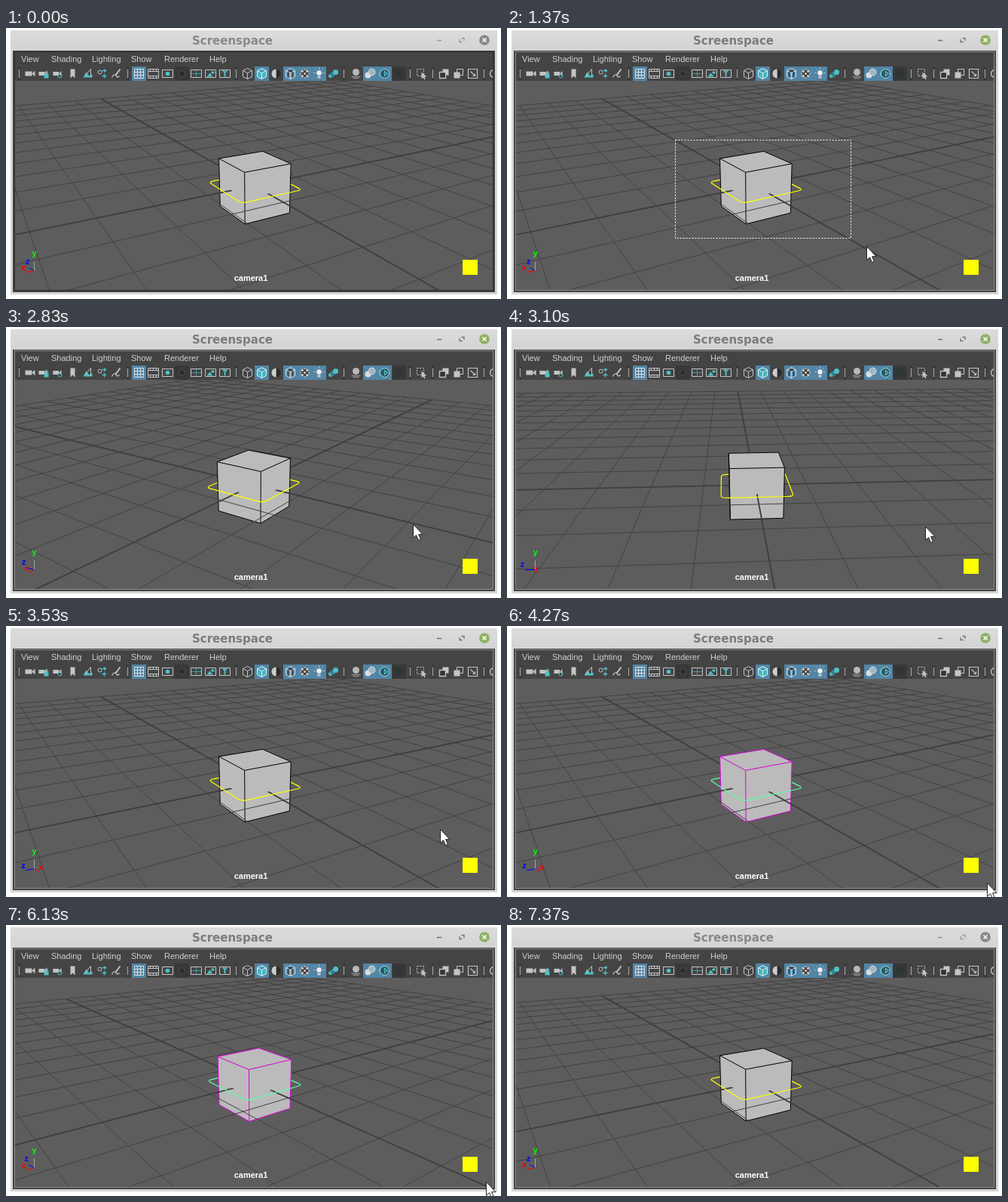
An HTML page for the animation above (7560 ms loop, 657x359 px).

```html
<!DOCTYPE html>
<html lang="en">
<head>
<meta charset="utf-8">
<title>Screenspace</title>
<style>
html, body { margin: 0; width: 100%; height: 100%; overflow: hidden; background: #fff; }
svg { display: block; }
text { font-family: "Liberation Sans", sans-serif; }
#title { font: bold 15px "DejaVu Sans", sans-serif; }
.menu { font-size: 11px; fill: #cfcfcf; }
.axis { font-size: 11px; font-weight: bold; text-anchor: middle; }
</style>
</head>
<body>
<svg width="657" height="359" viewBox="0 0 657 359">
  <defs>
    <linearGradient id="bar" x1="0" y1="0" x2="0" y2="1">
      <stop offset="0" stop-color="#dcdcdc"/><stop offset="1" stop-color="#d3d3d3"/>
    </linearGradient>
    <clipPath id="port"><rect x="12" y="70" width="634" height="277"/></clipPath>
    <clipPath id="panel"><rect x="10" y="31" width="637" height="40"/></clipPath>
  </defs>
  <rect x="6" y="3" width="646" height="350" fill="#d6d6d6"/>
  <rect x="6" y="3" width="646" height="27" fill="url(#bar)"/>
  <text id="title" x="247" y="22">Screenspace</text>
  <g id="buttons" fill="none" stroke-width="1.500">
    <path d="M572 16.500h6"/>
    <path d="M604.500 13.500h3.500v3.500M605.500 18.500h-3.500v-3.500" stroke-width="1.300"/>
  </g>
  <circle id="close" cx="635" cy="16" r="6.800"/>
  <path d="M632.500 13.500l5 5m0-5l-5 5" stroke="#fff" stroke-width="1.600"/>
  <rect x="9" y="30" width="640" height="320" fill="#444"/>
  <g id="menu"></g>
  <g id="tools" clip-path="url(#panel)"></g>
  <rect x="12" y="70" width="634" height="277" fill="#5d5d5d"/>
  <g clip-path="url(#port)" fill="none">
    <path id="lowFill" fill="#bbb"/>
    <path id="lowEdge"/>
    <path id="thin" stroke="#434343"/>
    <path id="thick" stroke="#3f3f3f" stroke-width="1.900"/>
    <path id="ring" stroke-width="1.200"/>
    <path id="upFill" fill="#bbb"/>
    <path id="upEdge"/>
    <g id="gizmo"></g>
  </g>
  <rect x="606" y="307" width="20" height="20" fill="#ff0"/>
  <text x="325" y="335" text-anchor="middle" font-size="11" font-weight="bold" fill="#fff">camera1</text>
  <rect id="border" x="11.500" y="31.500" width="635" height="316" fill="none"/>
  <rect id="marquee" fill="none" stroke="#fff" stroke-dasharray="2 2"/>
  <path id="cursor" d="M.5 -.5V17.500L4.500 13.700L7.500 20.500L10.400 19.300L7.600 12.700H13z" fill="#fff" stroke="#222"/>
</svg>
<script>
const LOOP = 7560, STEP = 33.34;
const $ = id => document.getElementById(id);
const set = (el, attrs) => { for (const k in attrs) el.setAttribute(k, attrs[k]); };
const add = (parent, tag, attrs, text) => {
  const el = document.createElementNS('http://www.w3.org/2000/svg', tag);
  set(el, attrs);
  if (text) el.textContent = text;
  parent.appendChild(el);
  return el;
};

// Menu and toolbar
[['View', 20], ['Shading', 60], ['Lighting', 114], ['Show', 166], ['Renderer', 210], ['Help', 270]]
  .forEach(([s, x]) => add($('menu'), 'text', { x, y: 45, class: 'menu' }, s));

const LIGHT = '#c4c4c4', TEAL = '#4fc0c8', DARK = '#2b2b2b';
const tools = $('tools');
const line = (x, d, stroke = LIGHT, w = 1, fill = 'none') =>
  add(tools, 'path', { d, stroke, fill, 'stroke-width': w, transform: `translate(${x + .5} 60.5)` });
const solid = (x, d, fill = LIGHT) => line(x, d, 'none', 0, fill);
const dot = (x, y, r, fill = TEAL, stroke = 'none') =>
  add(tools, 'circle', { cx: x + .5, cy: 60.5 + y, r, fill, stroke });
const tile = (x, fill) => add(tools, 'rect', { x: x - 9, y: 51, width: 19, height: 19, fill });

[17, 161, 305, 448, 536, 566, 634].forEach(x => {
  line(x, 'M0 -8V8', '#2f2f2f', 3);
  line(x, 'M0 -6V6', '#a0a0a0', 1.5);
});
[176, 339, 377, 396, 415, 483, 502].forEach(x => tile(x, '#5285a6'));
[233, 521].forEach(x => tile(x, '#383838'));

const box = 'M0 -7L6 -4V4L0 7L-6 4V-4zM-6 -4L0 -1L6 -4M0 -1V7';
const frame = 'M-7 -5H7V5H-7z';
const cam = (x, s) => solid(x, `M${-6 * s} ${-3 * s}H${3 * s}V${3 * s}H${-6 * s}zM${3 * s} 0L${7 * s} ${-4 * s}V${4 * s}z`);
cam(31, 1);
cam(48, .85); solid(51, 'M-1 1H5V6H-1z', TEAL); line(51, 'M0 1V-2Q2 -5 4 -2V1', TEAL);
cam(67, .85); dot(71, 3, 2.5, 'none', TEAL);
solid(88, 'M-3 -6H3V6L0 3L-3 6z');
solid(108, 'M-6 5L-2 -2L2 3L6 1V5z', TEAL); line(108, 'M-4 3L4 -6V4');
dot(124, -2, 2.5, 'none', LIGHT); line(127, 'M0 -4H5M3 -6L5 -4L3 -2M0 3H6M3 0V6', TEAL, 1.3);
line(146, 'M5 -6L-1 2', LIGHT, 2); line(146, 'M-6 5Q-3 -1 0 3Q1 6 4 3', LIGHT, 1.3);
line(176, 'M-6 -6H6V6H-6zM-2 -6V6M2 -6V6M-6 -2H6M-6 2H6', '#dedede');
line(195, 'M-7 -6H7V6H-7zM-7 -3H7M-7 3H7M-4 -6V-3M0 -6V-3M4 -6V-3M-4 3V6M0 3V6M4 3V6');
line(214, frame); dot(214, 0, 2.8);
dot(233, 0, 4, '#2c2c2c', '#505050');
line(252, frame); line(252, 'M-7 0H7M0 -5V5', TEAL).setAttribute('stroke-dasharray', '2 1');
line(271, frame); solid(271, 'M-5 4L-1 -1L3 4zM1 -3H5V0H1z', TEAL);
line(290, frame); line(290, 'M-3 -3H3M0 -3V4', TEAL, 2);
line(320, box);
line(339, box, '#d8f3f5', 1, '#46b6c0');
dot(358, 0, 5.5, '#8a8a8a'); solid(358, 'M0 -6A6 6 0 0 1 0 6z', DARK); solid(358, 'M0 -6A6 6 0 0 0 0 6z', '#ccc');
line(377, box, '#ddd'); line(377, 'M-3 -5L3 -2V5M3 -5L-3 -2V5', DARK);
dot(396, 0, 6, '#ccc'); line(396, 'M-5 -2L2 5M-2 -5L5 2M-5 2L2 -5M-2 5L5 -2', '#333', 1.6);
dot(415, -1, 3.2, '#eee'); solid(415, 'M-2 3H2V6H-2z', '#ccc');
line(415, 'M-7 -1H-5M5 -1H7M0 -8V-6M-5 -6L-4 -5M5 -6L4 -5', '#ccc');
dot(430, 3, 2.5, TEAL); dot(433, 1, 3.2, '#318690'); dot(437, -2, 3.5, TEAL);
dot(464, -2, 4.5, '#b8b8b8'); line(464, 'M-6 4H6M-4 6H4', '#888', 1.3);
dot(480, 2, 4, '#ddd'); dot(485, -2, 4.5, '#9fb7c4', '#ddd');
dot(502, 0, 6, '#31515f', '#a7dce0'); line(502, 'M-2 -5A5 5 0 0 0 -2 5M0 -3L4 0L0 3z', TEAL, 1.3);
solid(521, 'M-5 -5H5V5H-5z', '#2d3535');
line(551, 'M-6 -6H3V3H-6z').setAttribute('stroke-dasharray', '2 1.5');
solid(551, 'M0 -2V7L2 5L4 8L5 7L4 4H7z');
solid(581, 'M-2 -6H6V2H-2z'); line(581, 'M-6 -2H2V6H-6z', LIGHT, 1.3, '#333');
line(600, 'M-2 -6H6V2H-2z'); solid(600, 'M-6 -2H2V6H-6z');
line(619, 'M-6 -6H6V6H-6zM-3 -3L3 3M0 3H3V0', LIGHT, 1.2);
line(646, 'M1 -5A5 5 0 0 0 1 5', LIGHT, 1.3);

// Camera orbiting the origin; ground is the plane h = 0
const DIST = 9.03, FOCAL = 617, SIN = 0.34, COS = 0.94, CX = 329.5, CY = 209, SIZE = 12, NEAR = 0.3;
let ux = 1, uy = 0;
const ground = (x, z) => [x * ux - z * uy, x * uy + z * ux];
const view = (x, z, h) => {
  const [r, t] = ground(x, z);
  return [r, t * SIN - h * COS, DIST - t * COS - h * SIN];
};
const flat = ([r, v, d]) => `${(CX + FOCAL * r / d).toFixed(2)} ${(CY + FOCAL * v / d).toFixed(2)}`;
const pt = (x, z, h) => flat(view(x, z, h));
const poly = pts => 'M' + pts.map(p => pt(...p)).join('L');

function segment(a, b) {
  let p = view(...a, 0), q = view(...b, 0);
  if (p[2] < NEAR && q[2] < NEAR) return '';
  if (p[2] < NEAR) [p, q] = [q, p];
  if (q[2] < NEAR) {
    const k = (p[2] - NEAR) / (p[2] - q[2]);
    q = p.map((v, i) => v + (q[i] - v) * k);
  }
  return `M${flat(p)}L${flat(q)}`;
}

function drawGrid() {
  let thin = '', thick = '';
  for (let i = -SIZE; i <= SIZE; i++) {
    const d = segment([i, -SIZE], [i, SIZE]) + segment([-SIZE, i], [SIZE, i]);
    if (i) thin += d; else thick += d;
  }
  set($('thin'), { d: thin });
  set($('thick'), { d: thick });
}

const corners = [[1, 1], [-1, 1], [-1, -1], [1, -1]];

function drawCube(selected) {
  let lowFill = '', upFill = '', lowEdge = '', upEdge = '';
  const top = poly(corners.map(([x, z]) => [x / 2, z / 2, .5])) + 'Z';
  const posts = new Set();
  corners.forEach((a, i) => {
    const b = corners[(i + 1) % 4];
    const toward = ground((a[0] + b[0]) / 2, (a[1] + b[1]) / 2)[1];
    if (toward * DIST * COS < .5) return;
    const [ax, az, bx, bz] = [...a, ...b].map(v => v / 2);
    const A = h => [ax, az, h], B = h => [bx, bz, h];
    lowFill += poly([A(.05), A(-.5), B(-.5), B(.05)]) + 'Z';
    lowEdge += poly([A(-.5), B(-.5)]);
    upFill += poly([A(0), A(.5), B(.5), B(0)]) + 'Z';
    posts.add(a).add(b);
  });
  for (const [x, z] of posts) {
    lowEdge += poly([[x / 2, z / 2, 0], [x / 2, z / 2, -.5]]);
    upEdge += poly([[x / 2, z / 2, 0], [x / 2, z / 2, .5]]);
  }
  const stroke = selected ? '#d800d8' : '#000';
  set($('lowFill'), { d: lowFill });
  set($('upFill'), { d: upFill + top });
  set($('lowEdge'), { d: lowEdge, stroke });
  set($('upEdge'), { d: upEdge + top, stroke });

  const R = .66, C = .55;
  const ring = corners.map(([x, z], i) => {
    const s = [x * R, z * C, 0], e = [x * C, z * R, 0];
    const [p, q] = i % 2 ? [e, s] : [s, e];
    return `${i ? 'L' : 'M'}${pt(...p)}Q${pt(x * R, z * R, 0)} ${pt(...q)}`;
  }).join('') + 'Z';
  set($('ring'), { d: ring, stroke: selected ? '#5cffa8' : '#ff0' });
}

const arms = [['z', '#00f', '#00f', 0, 1, 0], ['x', '#f00', '#f00', 1, 0, 0], ['y', '#8fae9a', '#0f0', 0, 0, 1]]
  .map(([name, stroke, fill, ...dir]) => ({
    dir,
    rod: add($('gizmo'), 'path', { stroke }),
    tag: add($('gizmo'), 'text', { class: 'axis', fill }, name)
  }));

function drawGizmo() {
  for (const { dir, rod, tag } of arms) {
    const [r, v] = view(...dir);
    set(rod, { d: `M37.5 321.5L${37.5 + 13 * r} ${321.5 + 13 * v}` });
    set(tag, { x: 37.5 + 17 * r, y: 318 + 17 * v });
  }
}

// Timeline
const path = [
  [730, 130, 60], [1030, 223, 148], [1370, 478, 291], [1470, 508, 306], [1640, 508, 306],
  [2170, 500, 255], [2730, 500, 255], [2830, 541, 263], [3470, 577, 271], [3530, 577, 271],
  [3930, 638, 342], [6500, 638, 342], [7130, 502, 263], [7165, 514, 333], [7200, 514, 333]
];
function pointer(t) {
  const i = path.findIndex(k => k[0] > t);
  if (i < 1) return path[i ? path.length - 1 : 0].slice(1);
  const [t0, x0, y0] = path[i - 1], [t1, x1, y1] = path[i];
  const k = (t - t0) / (t1 - t0);
  return [x0 + (x1 - x0) * k, y0 + (y1 - y0) * k].map(Math.round);
}

function progress(t, start, steps) {
  if (t < start) return 0;
  return Math.min(1, (Math.floor((t - start) / STEP + .3) + 1) / steps);
}

function yaw(t) {
  const u = progress(t, 2730, 22), w = progress(t, 5800, 23);
  const out = 1 - (1 - u) ** 1.51;
  const back = 1 - (1 - w) ** (2.29 + 3.7 * w);
  return 149 - 90 * (out - back);
}

let last = '';
function render(t) {
  const focus = t >= 730 && t < 7370;
  const selected = t >= 4230 && t < 6930;
  const angle = yaw(t);
  const key = angle + '/' + selected;
  if (key !== last) {
    last = key;
    ux = Math.cos(angle * Math.PI / 180);
    uy = Math.sin(angle * Math.PI / 180);
    drawGrid();
    drawCube(selected);
    drawGizmo();
  }
  set($('title'), { fill: focus ? '#7c7c7c' : '#898989' });
  set($('buttons'), { stroke: focus ? '#707070' : '#999' });
  set($('close'), { fill: focus ? '#8fb163' : '#888' });
  set($('border'), { stroke: t >= 730 ? '#8a8a8a' : '#2b2b2b' });

  const [x, y] = pointer(t);
  const shown = t >= 730 && t < 6500 || t >= 7130 && t < 7200;
  set($('cursor'), { transform: `translate(${x - 1} ${y - 1})`, visibility: shown ? 'visible' : 'hidden' });

  const [mx, my] = pointer(t - 31);
  const drag = t > 1080 && t < 1640;
  set($('marquee'), {
    x: 223.5, y: 148.5, width: Math.max(0, mx - 223), height: Math.max(0, my - 148),
    visibility: drag ? 'visible' : 'hidden'
  });
}

const begin = performance.now();
function tick() {
  render((performance.now() - begin) % LOOP);
  requestAnimationFrame(tick);
}
render(0);
requestAnimationFrame(tick);
</script>
</body>
</html>
```
